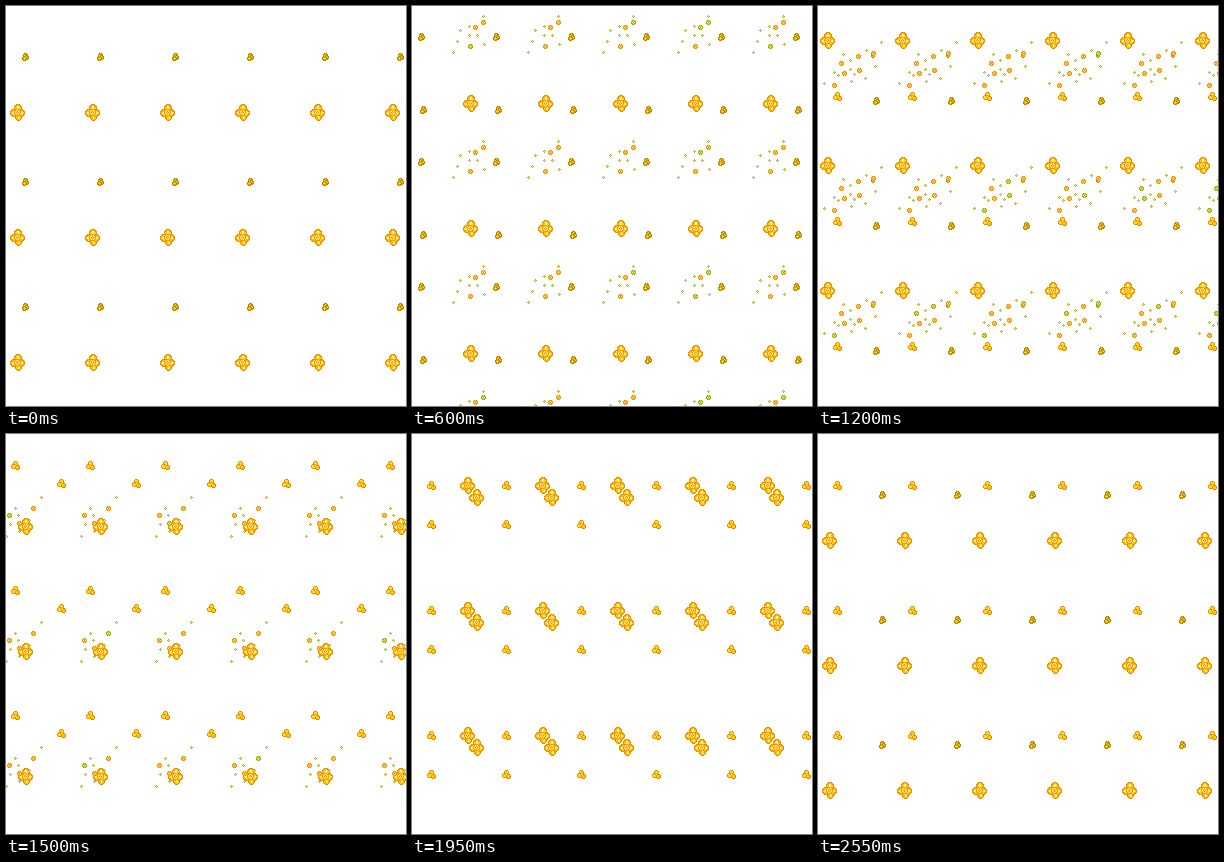
These frames come from a looping animation (400 px wide and 400 px high, 2.7 s). An HTML page with a canvas:

```html
<!DOCTYPE html>
<html>
<head>
<meta charset="utf-8">
<style>
html, body { margin: 0; width: 100%; height: 100%; overflow: hidden; background: #fff; }
canvas { display: block; }
</style>
</head>
<body>
<canvas id="stage" width="400" height="400"></canvas>
<script>
const ctx = document.getElementById('stage').getContext('2d');
const TILE_W = 75, TILE_H = 125, STEPS = 18, STEP_MS = 150;

// x, y, first step, size at each following step, vertical nudge when in full bloom
const roses = [
  [11, 104, 14, '1444444321', 0],
  [19, 51, 11, '123444321', 1],
  [58, 95, 1, '123444321', 0],
  [9, 31, 3, '1234444321', 1],
  [19, 90, 6, '1234444321', 0],
  [55, 49, 8, '123444321', 0],
  [64, 61, 11, '1244432', 0]
];

// Sparkle clusters: rings and specks as x, y pairs
const head = {
  rings: [71,16, 63,21, 58,40],
  specks: [71,10, 57,20, 48,24, 57,29, 65,29, 45,35, 72,38, 41,46]
};
const trail = {
  rings: [64,38, 49,41, 32,48, 50,55, 35,58, 25,70],
  specks: [72,27, 57,35, 66,51, 34,39, 41,45, 41,54, 25,57, 29,60, 45,59, 42,66, 56,63, 15,68]
};
const tail = {
  rings: [27,74, 3,81, 13,89],
  specks: [35,63, 9,74, 12,81, 4,90, 23,86, 13,97, 0,102]
};
// step: cluster, dx, dy
const flight = {
  3: [head, 13, -13], 4: [head, 0, 0],
  5: [trail, 17, -19], 6: [trail, 0, 0], 7: [trail, -4, 5], 8: [trail, -9, 9], 9: [trail, -18, 18],
  10: [tail, 0, 0], 11: [tail, -23, 10], 12: [tail, -32, 17]
};

// Hard-edged disc on the pixel grid; the centre may lie between pixels
function disc(x, y, r, color) {
  ctx.fillStyle = color;
  for (let row = Math.ceil(y - r); row <= y + r; row++) {
    const half = Math.sqrt(r * r - (row - y) ** 2);
    const from = Math.ceil(x - half), to = Math.floor(x + half);
    if (to >= from) ctx.fillRect(from, row, to - from + 1, 1);
  }
}

function dot(x, y, color) {
  ctx.fillStyle = color;
  ctx.fillRect(x, y, 1, 1);
}

function petal(x, y, r, edge, fill) {
  disc(x, y, r, edge);
  disc(x, y, r - 1, fill);
}

function rose(x, y, size, nudge) {
  if (size === 1) {
    disc(x - 0.5, y, 2.2, '#8c9a00');
    disc(x - 0.5, y, 1.2, '#d8d810');
  } else if (size === 2) {
    petal(x, y - 2, 2.3, '#c08800', '#ffe020');
    petal(x + 1, y, 2.3, '#c08800', '#ffe020');
    petal(x - 1, y + 1, 2.3, '#c08800', '#ffd800');
    dot(x, y - 1, '#d89000');
  } else if (size === 3) {
    petal(x, y - 2, 2.5, '#f09000', '#ffd820');
    petal(x + 2, y + 2, 2.5, '#e08400', '#ffc800');
    petal(x - 2, y + 1, 2.5, '#f09000', '#ffd820');
    disc(x, y, 1, '#ff9c00');
    dot(x, y, '#fff0a0');
  } else {
    y += 2 + nudge;
    petal(x + 1, y + 4.5, 3.9, '#e08800', '#ffc000');
    petal(x - 3.5, y + 0.5, 3.9, '#f09000', '#ffcc10');
    petal(x + 3.5, y + 0.5, 3.9, '#f09000', '#ffcc10');
    petal(x + 0.5, y - 4.5, 3.9, '#f09000', '#ffcc10');
    disc(x - 4.5, y + 0.5, 1.2, '#fff0a0');
    disc(x + 4.5, y + 0.5, 1.2, '#fff0a0');
    disc(x + 0.5, y - 5, 1.2, '#fff0a0');
    disc(x + 1.5, y + 5, 1.2, '#ffe470');
    disc(x, y, 3.2, '#ff9800');
    disc(x, y, 2.3, '#ffe070');
    disc(x, y, 1, '#f08800');
    dot(x, y, '#fff');
  }
}

function ring(x, y, green) {
  disc(x, y, 2.3, green ? '#a4b400' : '#ff9800');
  disc(x, y, 1, green ? '#f4f490' : '#ffe890');
  dot(x, y, green ? '#98a400' : '#f07800');
}

function speck(x, y, grey) {
  disc(x, y, 1, grey ? '#a4a498' : '#a4b400');
  dot(x, y, '#f0ec70');
}

function sparkles(step, left, top, seed) {
  if (!flight[step]) return;
  const [cluster, dx, dy] = flight[step];
  const each = (list, draw, share) => {
    for (let i = 0; i < list.length; i += 2) {
      const x = list[i] + dx, y = list[i + 1] + dy;
      if (x < 0 || x >= TILE_W || y < 9) continue;
      const noise = Math.abs(Math.sin(seed * 12.9 + i * 7.3 + step * 3.1) * 437.5) % 1;
      draw(left + x, top + y, noise < share);
    }
  };
  each(cluster.specks, speck, 0.2);
  each(cluster.rings, ring, 0.2);
}

function paint(step) {
  ctx.fillStyle = '#fff';
  ctx.fillRect(0, 0, 400, 400);
  for (let row = 0; row < 4; row++) {
    for (let col = 0; col < 6; col++) {
      const left = col * TILE_W, top = row * TILE_H;
      for (const [x, y, start, sizes, nudge] of roses) {
        const size = sizes[(step - start + STEPS) % STEPS];
        if (size) rose(left + x, top + y, +size, nudge);
      }
      sparkles(step, left, top, row * 6 + col);
    }
  }
}

let shown = -1;
function tick() {
  const step = Math.floor(performance.now() / STEP_MS) % STEPS;
  if (step !== shown) paint(shown = step);
  requestAnimationFrame(tick);
}
tick();
</script>
</body>
</html>
```
